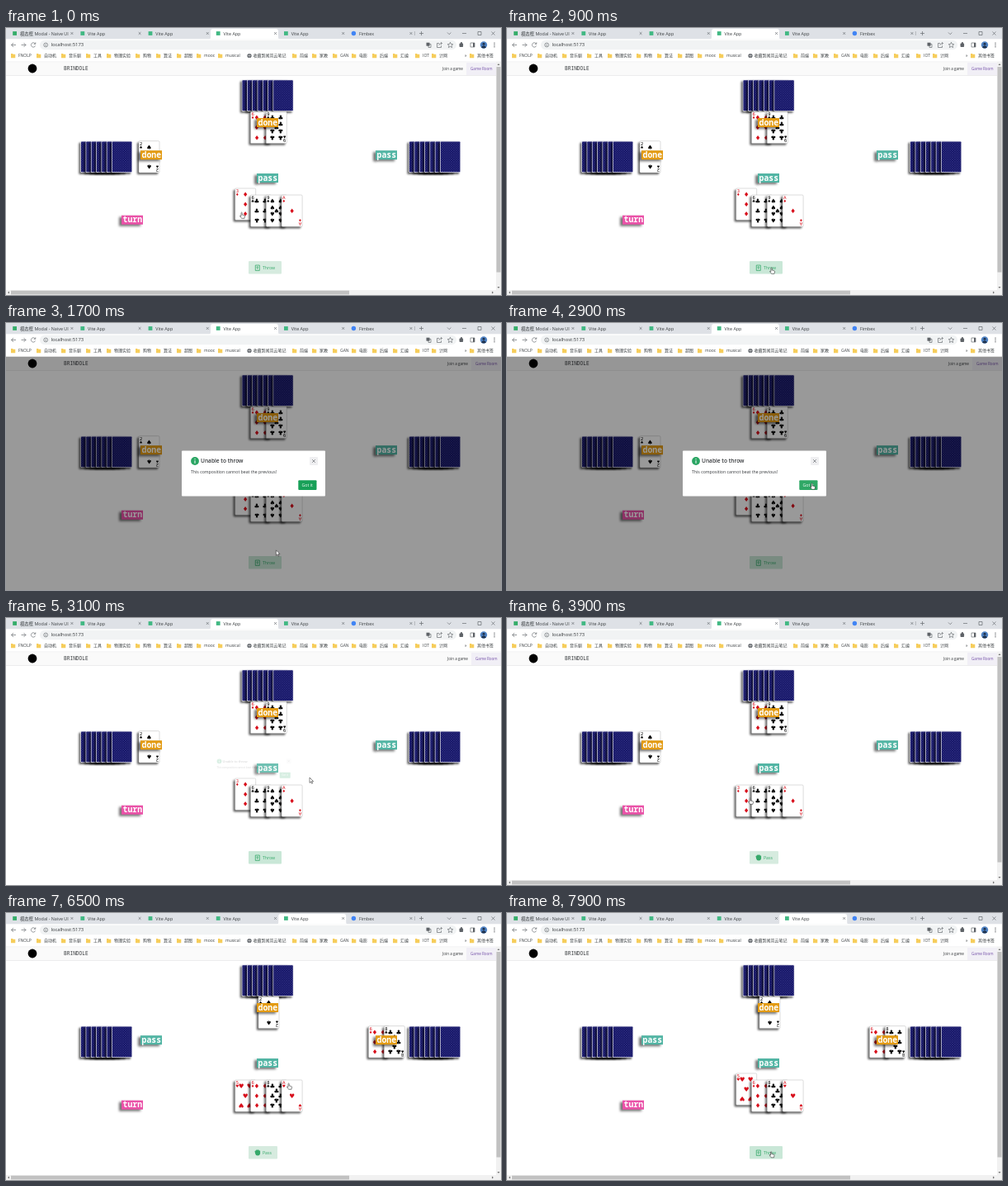
An HTML page that plays this animation: 600x323 px, repeating every 8000 ms.

```html
<!DOCTYPE html>
<html lang="en">
<head>
<meta charset="utf-8">
<title>Card table</title>
<style>
html, body { margin: 0; height: 100%; overflow: hidden; background: #fff; }
svg { display: block; width: 100%; height: 100%; }
text { font: 5.2px "Open Sans", "Noto Sans CJK SC", "Noto Sans CJK", sans-serif; fill: #333639; white-space: pre; }
.tab { font-size: 5.4px; fill: #3c4043; }
.mark { font-size: 5px; fill: #3c4043; }
.menu { font-size: 4.6px; }
.brand { font: 6.2px "Noto Sans Mono", monospace; }
.badge text { font: 600 9.8px "Noto Sans Mono", monospace; fill: #fff; }
.suit { font-family: "DejaVu Sans", sans-serif; text-anchor: middle; }
.bold { font-weight: 600; }
.card { filter: drop-shadow(-2px 2px 1.3px rgba(0,0,0,.6)); }
.badge { filter: drop-shadow(-3px 2px 1.6px rgba(0,0,0,.55)); }
.line { fill: none; stroke: #5f6368; stroke-width: .65; }
</style>
</head>
<body>
<svg id="stage" viewBox="0 0 600 323" preserveAspectRatio="none"></svg>
<script>
const rect = (x, y, w, h, fill, more = '') =>
  `<rect x="${x}" y="${y}" width="${w}" height="${h}" fill="${fill}" ${more}/>`;
const dot = (x, y, r, fill) => `<circle cx="${x}" cy="${y}" r="${r}" fill="${fill}"/>`;
const line = (d, more = '') => `<path class="line" d="${d}" ${more}/>`;
const text = (x, y, s, cls = '', more = '') => `<text x="${x}" y="${y}" class="${cls}" ${more}>${s}</text>`;
const group = (id, body) => `<g id="${id}">${body}</g>`;
const cross = (x, y, r, more) =>
  line(`M${x - r} ${y - r}l${2 * r} ${2 * r}m0 ${-2 * r}l${-2 * r} ${2 * r}`, more);

// Browser window
const tabX = i => 9.4 + 82.2 * i;
const tabs = ['模态框 Modal - Naive UI', 'Vite App', 'Vite App', 'Vite App', 'Vite App', 'Fimbex'];
const tabShape = (id, fill) =>
  `<path id="${id}" fill="${fill}" d="M-10 13.5q2 0 2-2V4q0-3 3-3H71q3 0 3 3V11.5q0 2 2 2z"/>`;

function tabStrip() {
  return rect(0, 0, 600, 13.5, '#dee1e6') + tabShape('hoverTab', '#eceef1') + tabShape('activeTab', '#fff') +
    tabs.map((name, i) => {
      const x = tabX(i);
      const icon = i === 5 ? dot(x + 1, 6.5, 2.7, '#4285f4') : rect(x - 1.2, 4.1, 4.8, 4.8, i ? '#41b883' : '#36ad6a');
      return icon + text(x + 7.5, 8.5, name, 'tab') + cross(x + 70.5, 6.5, 1.4) +
        (i < 5 ? '' : line(`M${x + 75} 4v5`, 'opacity=".5"'));
    }).join('') +
    line('M501 6.5h5M503.5 4v5M535 5.5l2.2 2.2 2.2-2.2M553 6.5h5M572 4.5h4v4h-4z') + cross(590.5, 6.5, 2);
}

function toolbar() {
  return rect(0, 13.5, 600, 27, '#fff') + rect(41, 14.8, 505, 11.4, '#f1f3f4', 'rx="5.7"') +
    line('M12 20.5H6.5m2.5-2.5l-2.5 2.5 2.5 2.5M18.5 20.5H24m-2.5-2.5l2.5 2.5-2.5 2.5') +
    line('M35.4 19a2.7 2.7 0 1 0 .2 2.5M35.8 17.4v2h-2') +
    line('M50.6 20.5a2.4 2.4 0 1 0-4.8 0 2.4 2.4 0 1 0 4.8 0M48.2 20v1.8M48.2 19v.4') +
    text(54.5, 22.3, 'localhost:5173', '', 'style="font-size:5.9px"') +
    rect(509.5, 17.7, 4, 4, '#5f6368') + line('M512 19.5h3v4h-3z') +
    line('M525 18.5h-2.5v5h5v-2.2M524.5 21q.5-2.5 4-2.5m-1.5-1.5l1.5 1.5-1.5 1.5') +
    line('M538.5 17.3l1 2.2 2.3.2-1.8 1.6.6 2.3-2.1-1.2-2.1 1.2.6-2.3-1.8-1.6 2.3-.2z') +
    rect(549.5, 18.5, 4.6, 4.6, '#5f6368', 'rx="1"') + dot(552, 18.2, 1.1, '#5f6368') +
    line('M563 18h5v5h-5z') + rect(566, 18, 2, 5, '#5f6368') +
    dot(579, 20.5, 4.2, '#4f83c4') + dot(579, 19.3, 1.5, '#20324d') +
    '<path d="M576 23.4q3-4.4 6 0-3 2-6 0" fill="#20324d"/>' +
    [18.3, 20.5, 22.7].map(y => dot(592, y, .7, '#5f6368')).join('');
}

const marks = [[6, 'FNOLP'], [37, '自动机'], [67, '音乐剧'], [97, '工具'], [122, '物理实验'], [157, '购物'],
  [182, '算法'], [207, '超图'], [231, 'mooc'], [257, 'musical'], [347, '前端'], [371, '家教'], [396, 'GAN'],
  [419, '电影'], [444, '后端'], [469, '汇编'], [496, 'IOT'], [516, '计网'], [562, '其他书签']];
const folder = x => `<path d="M${x} 31h2l.7.8h2.6v4.4H${x}z" fill="#f6cd5b"/>`;

function bookmarks() {
  return marks.map(([x, name]) => folder(x) + text(x + 9, 35.3, name, 'mark')).join('') +
    dot(295, 33.5, 2.6, '#5f6368') + line('M293 33.5h4M295 31.2v4.6', 'style="stroke:#fff;stroke-width:.4"') +
    text(299.6, 35.3, '收藏到闻岚云笔记', 'mark') + text(556, 35.2, '»', 'mark');
}

function header() {
  return rect(0, 40.5, 600, 17, '#fafafa') + line('M0 40.7H600M0 57.5H600', 'style="stroke:#e2e2e5;stroke-width:.6"') +
    dot(32, 49, 5.4, '#000') + text(70, 51.1, 'BRINDOLE', 'brand') +
    group('nav', rect(558, 42, 36, 15, '#f1eff6') + text(529, 50.8, 'Join a game', 'menu') +
      text(563, 50.8, 'Game Room', 'menu', 'style="fill:#7450a8"'));
}

const scrollbars = rect(594, 41, 6, 282, '#f1f1f1') + rect(0, 317, 600, 6, '#f1f1f1') +
  rect(594.5, 47, 5, 248.5, '#c1c1c1') + rect(6, 317.7, 410, 4.7, '#c1c1c1') +
  '<path fill="#777" d="M595.5 45l1.5-2 1.5 2zM595.5 313l1.5 2 1.5-2zM4 318.5v3l-2-1.5zM589 318.5v3l2-1.5z"/>';

// Cards
const grid = (xs, ys) => xs.flatMap(x => ys.map(y => [x, y]));
const sides = [.3, .7], ends = [.19, .81], thirds = [.19, .5, .81], mid = [.5];
const pips = {
  A: grid(mid, mid), 2: grid(mid, ends), 3: grid(mid, thirds),
  5: [...grid(sides, ends), [.5, .5]], 6: grid(sides, thirds),
  8: [...grid(sides, thirds), ...grid(mid, [.35, .65])],
  9: [...grid(sides, [.19, .4, .6, .81]), [.5, .5]]
};
const W = 25, H = 38.3;

function card(x, y, rank, suit, id = '') {
  const ink = `style="fill:${'♦♥'.includes(suit) ? '#d8101c' : '#000'};font-size:`;
  const index = text(2.6, 5.2, rank, 'suit', ink + '5.2px"') + text(2.6, 9.2, suit, 'suit', ink + '4.6px"');
  const face = pips[rank].map(([u, v]) =>
    `<g transform="translate(${u * W} ${v * H})${v > .5 ? 'rotate(180)' : ''}">${text(0, 2.7, suit, 'suit', ink + '7.6px"')}</g>`);
  return `<g ${id && `id="${id}"`}><g class="card" transform="translate(${x} ${y})">` +
    rect(0, 0, W, H, '#fff', 'rx="1.2" stroke="#aaa" stroke-width=".4"') + index + face.join('') +
    `<g transform="rotate(180 ${W / 2} ${H / 2})">${index}</g></g></g>`;
}

const stack = (x, y) => Array.from({ length: 7 }, (_, i) =>
  `<g class="card" transform="translate(${x + 6.3 * i} ${y})">` +
  rect(0, 0, W, H, '#e4e4ee', 'rx="1.2"') + rect(.7, .7, W - 1.4, H - 1.4, 'url(#weave)', 'rx=".8"') + '</g>').join('');

const colors = { done: '#e39b12', pass: '#52b5a4', turn: '#ea52a8' };
const badge = (x, y, word, id = '') => `<g class="badge" ${id && `id="${id}"`} transform="translate(${x} ${y})">` +
  rect(0, 0, 26, 11, colors[word]) + text(1.5, 8.6, word) + '</g>';

const hand = (cards, id) => cards.map(([rank, suit], i) =>
  card(277.7 + 18.8 * i, 202, rank, suit, i ? '' : id)).join('');

const firstSeat = card(296.5, 101.3, 6, '♦') + card(315.3, 101.3, 9, '♣') + card(161, 136.7, 2, '♠') +
  hand([[3, '♦'], [6, '♣'], [9, '♠'], ['A', '♦']], 'three') +
  badge(163, 148.2, 'done') + badge(448, 148.2, 'pass');
const secondSeat = card(306, 101.3, 2, '♠') + card(439.5, 136.7, 6, '♦') + card(458.3, 136.7, 8, '♣') +
  hand([[5, '♥'], [6, '♦'], [8, '♣'], ['A', '♥']], 'five') +
  badge(163, 148.2, 'pass') + badge(448, 148.2, 'done');

const green = 'style="fill:#36a96a"';
const throwLabel = line('M302.3 287h5v6.4h-5zM304.8 292v-3.4m-1.2 1.2l1.2-1.2 1.2 1.2', 'style="stroke:#36a96a;stroke-width:.8"') +
  text(311, 292, 'Throw', '', green);
const passLabel = '<path fill="#36a96a" d="M301.5 288l1.6-.8.6-1 1.2.6 1.2-.6.8 1.2 1.2.2v3.6q-.6 2.4-3 2.4-2.6 0-3-2.6z"/>' +
  text(311, 292, 'Pass', '', green);

const alertBox = rect(270, 279.3, 74.5, 30.7, '#fcf4e7', 'rx="1"') +
  dot(279.8, 288.6, 4, '#dfa02c') + rect(279.4, 286.2, .9, 3, '#fff') + rect(279.4, 290, .9, .9, '#fff') +
  text(287, 290.8, 'Unable to throw', 'bold', 'style="font-size:5.7px"') +
  text(287, 302.1, "It's not your turn yet..", '', 'style="fill:#62656b"');

const modal = rect(213, 154.4, 174, 55, '#fff', 'rx="1"') + dot(229, 167, 4.9, '#2aa563') +
  rect(228.5, 166.2, 1, 3.6, '#fff') + rect(228.5, 164, 1, 1.1, '#fff') +
  text(236, 169.3, 'Unable to throw', 'bold', 'style="font-size:6.6px"') +
  rect(368, 162, 10, 10, '#efeff1', 'rx="1"') + cross(373, 167, 1.9) +
  text(224, 182, 'This composition cannot beat the previous!') +
  rect(354.3, 190.2, 22.2, 11.8, '#18a058', 'rx="1" id="gotIt"') + text(358.6, 198, 'Got it', '', 'style="fill:#fff"');

const pointer = 'stroke="#111" stroke-width=".5" fill="#fff"';
const arrow = `<path id="arrow" ${pointer} d="M0 0V6.4L1.5 5 2.6 7.3 3.6 6.9 2.5 4.6H4.6z"/>`;
const finger = `<path id="finger" ${pointer} d="M0 .5q.6-1 1.2 0V3l2.4.5q1 .3.9 1.2L4 7.3H.6L-1.5 4.4q.3-.9 1.5.2z"/>`;

stage.innerHTML = `<defs><pattern id="weave" width="2.8" height="2.8" patternUnits="userSpaceOnUse">
  <rect width="2.8" height="2.8" fill="#0d0d5e"/>
  <path d="M0 0l2.8 2.8M2.8 0L0 2.8" stroke="#5252a6" stroke-width=".4"/></pattern></defs>` +
  rect(0, 40, 600, 283, '#fff') +
  group('table',
    stack(285.7, 62.5) + stack(90.3, 136.7) + stack(488.3, 136.7) +
    group('first', firstSeat) + group('second', secondSeat) +
    badge(304, 109, 'done') + badge(304, 176, 'pass') + badge(0, 0, 'turn', 'turn')) +
  group('button', rect(294, 282, 40, 15.6, '#d6ebdf', 'rx="1" id="plate"') +
    group('throwing', throwLabel) + group('passing', passLabel)) +
  group('notice', alertBox) + header() + group('bars', scrollbars) +
  rect(0, 40.5, 600, 283, '#000', 'id="shade"') + group('dialog', modal) +
  tabStrip() + toolbar() + bookmarks() + group('cursor', arrow + finger);

// Motion
const $ = id => document.getElementById(id);
const show = (id, on) => $(id).style.display = on ? '' : 'none';
const move = (id, x, y) => $(id).setAttribute('transform', `translate(${x} ${y})`);
const clamp = v => Math.max(0, Math.min(1, v));
const path = [[0, 285, 223], [200, 285, 223], [900, 320, 290], [1500, 320, 290], [2300, 367, 193],
  [2400, 367, 193], [2600, 369, 194], [2900, 369, 194], [3100, 368, 193], [3500, 294, 218], [3900, 294, 218],
  [4600, 314, 287], [4800, 314, 287], [5400, 376, 0], [5600, 372, 4], [5800, 372, 4], [6500, 342, 206],
  [6700, 342, 206], [7000, 288, 216], [7300, 288, 216], [7800, 319.5, 288.5], [8000, 319.5, 288.5]];

function cursorAt(t) {
  const i = path.findIndex(p => p[0] > t);
  const [a, b] = [path[i - 1], path[i]];
  const u = (t - a[0]) / (b[0] - a[0]), e = u * u * (3 - 2 * u);
  return [a[1] + (b[1] - a[1]) * e, a[2] + (b[2] - a[2]) * e];
}

function draw(t) {
  const second = t >= 5800, waiting = t >= 4800 && !second;
  const locked = t >= 1500 && t < 3200;
  const open = 1 - (1 - clamp((t - 1420) / 250)) ** 3;
  const left = (1 - clamp((t - 2920) / 250)) ** 1.4;
  const p = locked ? open * left : 0;
  const throwing = t < 3700 || t >= 7400;
  const [x, y] = cursorAt(t);
  const over = (l, r, top, bottom) => x >= l && x <= r && y >= top && y <= bottom;

  show('first', !second);
  show('second', second);
  move('table', 0, waiting ? -2 : 0);
  move('three', 0, t < 3500 ? -8 : t < 3600 ? -4 : 0);
  move('five', 0, t < 7000 ? 0 : t < 7100 ? -4 : -8);
  waiting ? move('turn', 507, 112) : move('turn', 140, 226.7);

  const onButton = !waiting && over(294, throwing ? 334 : 329, 282, 298);
  const focused = t >= 1500 && t < 3700;
  show('button', !waiting);
  show('notice', waiting);
  show('throwing', throwing);
  show('passing', !throwing);
  $('plate').setAttribute('width', throwing ? 40 : 35);
  $('plate').setAttribute('fill', onButton || focused ? '#c9e7d7' : '#d6ebdf');

  move('nav', locked ? 6 : 0, 0);
  show('bars', !locked);
  $('shade').setAttribute('opacity', .4 * p * (t > 2900 ? p * p : 1));
  const s = .5 + p / 2;
  $('dialog').setAttribute('opacity', p);
  $('dialog').setAttribute('transform', `translate(300 182) scale(${s}) translate(-300 -182)`);
  const onGotIt = locked && t < 3000 && over(354, 377, 190, 202);
  $('gotIt').setAttribute('fill', onGotIt ? '#2fa866' : '#18a058');

  move('activeTab', tabX(second ? 4 : 3), 0);
  move('hoverTab', tabX(4), 0);
  show('hoverTab', y < 13 && !second);
  const pointing = onButton || onGotIt || (!locked && over(278, 359, 194, 240));
  show('finger', pointing);
  show('arrow', !pointing);
  move('cursor', x, y);
}

// Time advances in steps of a tenth of a second
function tick(now) {
  draw(Math.floor(now % 8000 / 100) * 100);
  requestAnimationFrame(tick);
}
draw(0);
requestAnimationFrame(tick);
</script>
</body>
</html>
```
